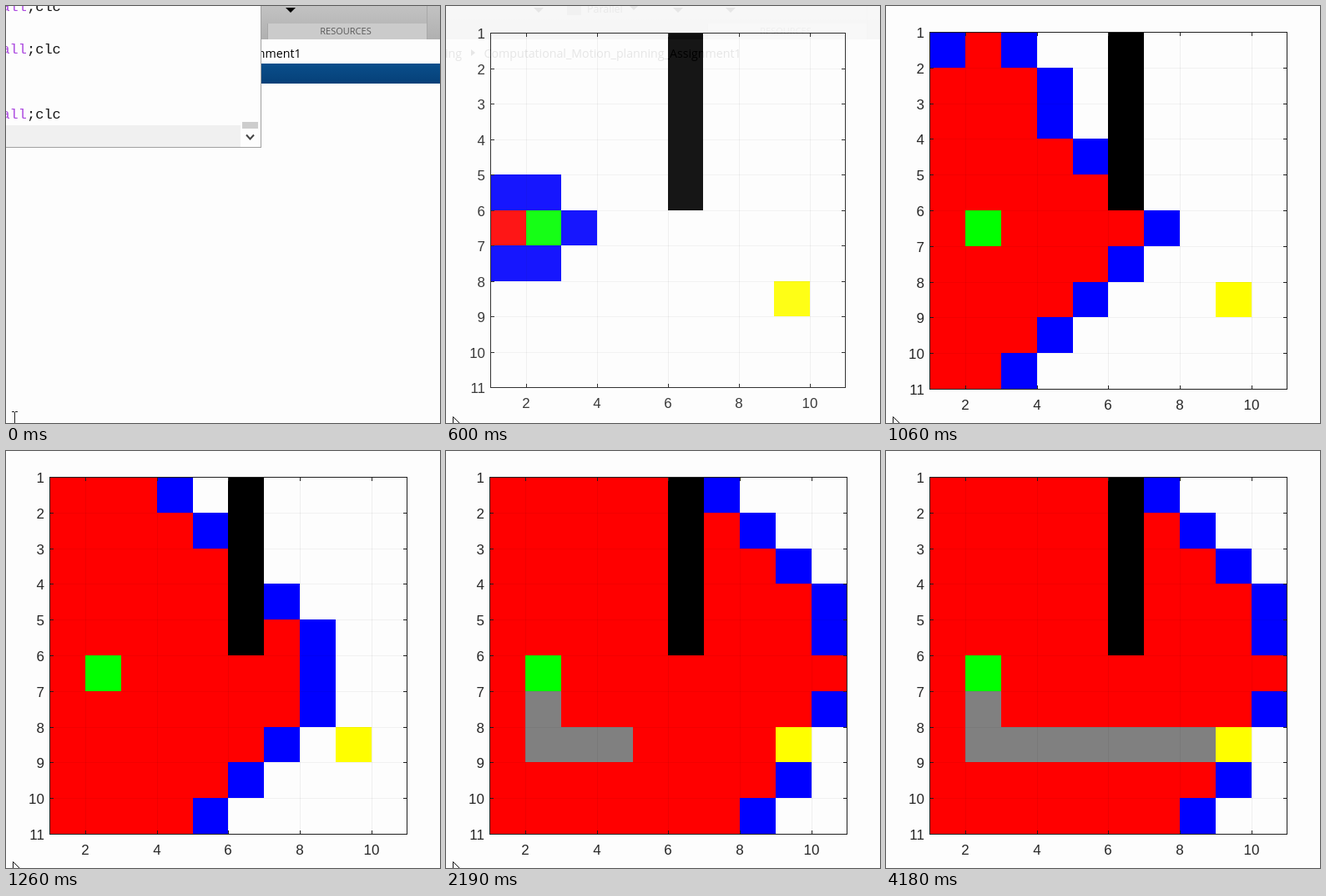
Write an HTML page with a canvas that moves like this. It is 520 px wide and 500 px high and loops after 5710 ms.

```html
<!DOCTYPE html>
<html lang="en">
<head>
<meta charset="utf-8">
<title>Grid search</title>
<style>
html, body { margin: 0; width: 100%; height: 100%; overflow: hidden; background: #fdfdfe; }
canvas { display: block; }
</style>
</head>
<body>
<canvas id="stage" width="520" height="500"></canvas>
<script>
const W = 520, H = 500, LOOP = 5710, STEP = 66.4;
const N = 10, START = 15, GOAL = 87, PAPER = '#fdfdfd';
const ctx = document.getElementById('stage').getContext('2d');
const layer = document.createElement('canvas');
layer.width = W;
layer.height = H;
const fig = layer.getContext('2d');

// The plot grows around the middle of its window while that opens.
let zoom = 1;
const gx = i => Math.round(195 + (52.49 + i * 42.8 - 195) * zoom);
const gy = i => Math.round(202 + (31 + i * 42.8 - 202) * zoom);

const clamp = (v, a, b) => Math.min(b, Math.max(a, v));
const isWall = i => i >= 50 && i <= 54;

function rect(g, color, x, y, w, h) {
  g.fillStyle = color;
  g.fillRect(x, y, w, h);
}

function text(g, str, x, y, font, color, align = 'left') {
  g.font = font;
  g.fillStyle = color;
  g.textAlign = align;
  g.fillText(str, x, y);
}

function shape(g, points) {
  g.beginPath();
  points.forEach(([x, y]) => g.lineTo(x, y));
}

// Cells are numbered column by column; ties go to the lowest number.
function neighbours(i) {
  const r = i % N, list = [];
  if (r > 0) list.push(i - 1);
  if (r < N - 1) list.push(i + 1);
  if (i >= N) list.push(i - N);
  if (i < N * N - N) list.push(i + N);
  return list.filter(j => !isWall(j));
}

function search(count) {
  const dist = Array(N * N).fill(Infinity), closed = new Set();
  dist[START] = 0;
  for (let n = 0; n < count; n++) {
    let best = -1;
    dist.forEach((d, i) => {
      if (d < Infinity && !closed.has(i) && (best < 0 || d < dist[best])) best = i;
    });
    closed.add(best);
    if (best === GOAL) break;
    for (const j of neighbours(best)) dist[j] = Math.min(dist[j], dist[best] + 1);
  }
  return { dist, closed };
}

// Number of expanded cells at a given tick.
function expanded(k) {
  const keys = [[6, 0], [8, 1], [9, 2], [10, 2], [11, 8], [16, 36], [19, 52], [24, 77]];
  if (k <= 6) return 0;
  for (let i = 1; i < keys.length; i++) {
    const [a, m] = keys[i - 1], [b, n] = keys[i];
    if (k <= b) return Math.round(m + (n - m) * (k - a) / (b - a));
  }
  return 77;
}

function drawCells(k) {
  const { dist, closed } = search(expanded(k));
  const steps = clamp(Math.floor((k - 24) / 2.25), 0, 8);
  const route = new Set();
  for (let s = 0; s < steps; s++) route.add(s ? 7 + s * 10 : 16);
  for (let i = 0; i < N * N; i++) {
    const c = Math.floor(i / N), r = i % N;
    const color = i === START ? '#00ff00' : i === GOAL ? '#ffff00'
      : isWall(i) ? '#000' : route.has(i) ? '#808080'
      : closed.has(i) ? '#ff0000' : dist[i] < Infinity ? '#0000ff' : null;
    if (color) rect(fig, color, gx(c), gy(r), gx(c + 1) - gx(c), gy(r + 1) - gy(r));
  }
}

function drawGrid() {
  fig.globalCompositeOperation = 'multiply';
  for (let i = 1; i < N; i++) {
    if (i % 2) rect(fig, '#f1f1f1', gx(i), gy(0), 1, gy(N) - gy(0));
    rect(fig, '#f3f3f3', gx(0), gy(i), gx(N) - gx(0), 1);
  }
  fig.globalCompositeOperation = 'source-over';
}

function drawAxes() {
  const x0 = gx(0), x1 = gx(N), y0 = gy(0), y1 = gy(N);
  const ink = '#1f1f1f', label = '#262626';
  const font = 17 * zoom + 'px "Liberation Sans", Arial, sans-serif';
  fig.strokeStyle = ink;
  fig.lineWidth = 1;
  fig.strokeRect(x0 + 0.5, y0 + 0.5, x1 - x0, y1 - y0);
  for (let i = 0; i <= N; i++) {
    rect(fig, ink, x0, gy(i), 5, 1);
    rect(fig, ink, x1 - 4, gy(i), 5, 1);
    text(fig, i + 1, x0 - 6, gy(i) + 7, font, label, 'right');
    if (i % 2) {
      rect(fig, ink, gx(i), y0, 1, 5);
      rect(fig, ink, gx(i), y1 - 4, 1, 5);
      text(fig, i + 1, gx(i), y1 + 25, font, label, 'center');
    }
  }
}

function drawFigure(k) {
  zoom = k >= 11 ? 1 : 0.993 - 0.012 * Math.max(0, 9 - k);
  rect(fig, PAPER, 0, 0, W, H);
  drawCells(k);
  drawGrid();
  drawAxes();
  ctx.globalAlpha = k >= 11 ? 1 : 0.91 * (k - 3) / 6;
  ctx.drawImage(layer, 0, 0);
  ctx.globalAlpha = 1;
}

function drawDesktop(fade) {
  const ui = '"Open Sans", "Noto Sans", sans-serif';
  const strip = ctx.createLinearGradient(0, 0, 0, 40);
  strip.addColorStop(0, '#c2c2c2');
  strip.addColorStop(1, '#b0b0b0');
  rect(ctx, strip, 0, 0, W, 40);
  rect(ctx, '#cbcbcb', 313, 21, 192, 19);
  rect(ctx, '#a8a8a8', 313, 21, 1, 19);
  rect(ctx, '#a8a8a8', 504, 0, 1, 40);
  text(ctx, 'RESOURCES', 407, 34, '11px ' + ui, '#5a5a5a', 'center');
  text(ctx, 'Parallel', 169, 8, '12.5px ' + ui, '#222');
  rect(ctx, '#7c7c7c', 145, 0, 17, 11);
  ctx.fillStyle = '#000';
  for (const [x, y] of [[111, 2], [225, -1], [278, 2], [341, 2]]) {
    shape(ctx, [[x - 6, y], [x + 6, y], [x, y + 6]]);
    ctx.fill();
  }
  const path = '14.2px ' + ui;
  text(ctx, 'Computational_Motion_planning_Assignment1', 353.5, 62, path, '#000', 'right');
  text(ctx, 'ing', 19, 62, path, '#000', 'right');
  shape(ctx, [[30, 52], [35, 56], [30, 60]]);
  ctx.fill();

  ctx.globalAlpha = fade;
  const bar = ctx.createLinearGradient(0, 68, 0, 93);
  bar.addColorStop(0, '#0a4f8c');
  bar.addColorStop(1, '#064078');
  rect(ctx, bar, 0, 69, W, 24);
  drawConsole();
  ctx.globalAlpha = 1;
}

function drawConsole() {
  const mono = '17px "Liberation Mono", "Courier New", monospace';
  rect(ctx, PAPER, 0, 0, 306, 170);
  for (const y of [6, 57, 135]) {
    text(ctx, 'all', 25, y, mono, '#ac4ae0', 'right');
    text(ctx, ';clc', 25, y, mono, '#161616');
  }
  rect(ctx, '#f0f0f0', 0, 143, 281, 26);
  rect(ctx, '#cdcdcd', 283, 139, 19, 8);
  ctx.strokeStyle = '#444';
  ctx.lineWidth = 2;
  shape(ctx, [[288, 154.5], [292.5, 159.5], [297, 154.5]]);
  ctx.stroke();
  rect(ctx, '#a0a0a0', 0, 169, 306, 1);
  rect(ctx, '#a0a0a0', 305, 0, 1, 170);
}

function drawCursor(t, k) {
  if (k < 4) {
    rect(ctx, '#222', 10, 487, 1, 13);
    rect(ctx, '#222', 7, 486, 3, 1);
    rect(ctx, '#222', 11, 486, 3, 1);
  } else if (t < 3580) {
    const y = t < 3510 ? 492.5 : 496.5;
    shape(ctx, [[8.5, y], [8.5, y + 16], [12, y + 12], [20, y + 11.5]]);
    ctx.closePath();
    ctx.fillStyle = '#fff';
    ctx.fill();
    ctx.strokeStyle = '#111';
    ctx.lineWidth = 1;
    ctx.stroke();
  }
}

function draw(t) {
  const k = Math.floor((t + 7) / STEP);
  rect(ctx, PAPER, 0, 0, W, H);
  if (k < 11) drawDesktop(clamp(1 - (k - 1) / 4, 0, 1));
  if (k > 3) drawFigure(k);
  drawCursor(t, k);
}

const begin = performance.now();
function tick() {
  draw((performance.now() - begin) % LOOP);
  requestAnimationFrame(tick);
}
tick();
</script>
</body>
</html>
```
